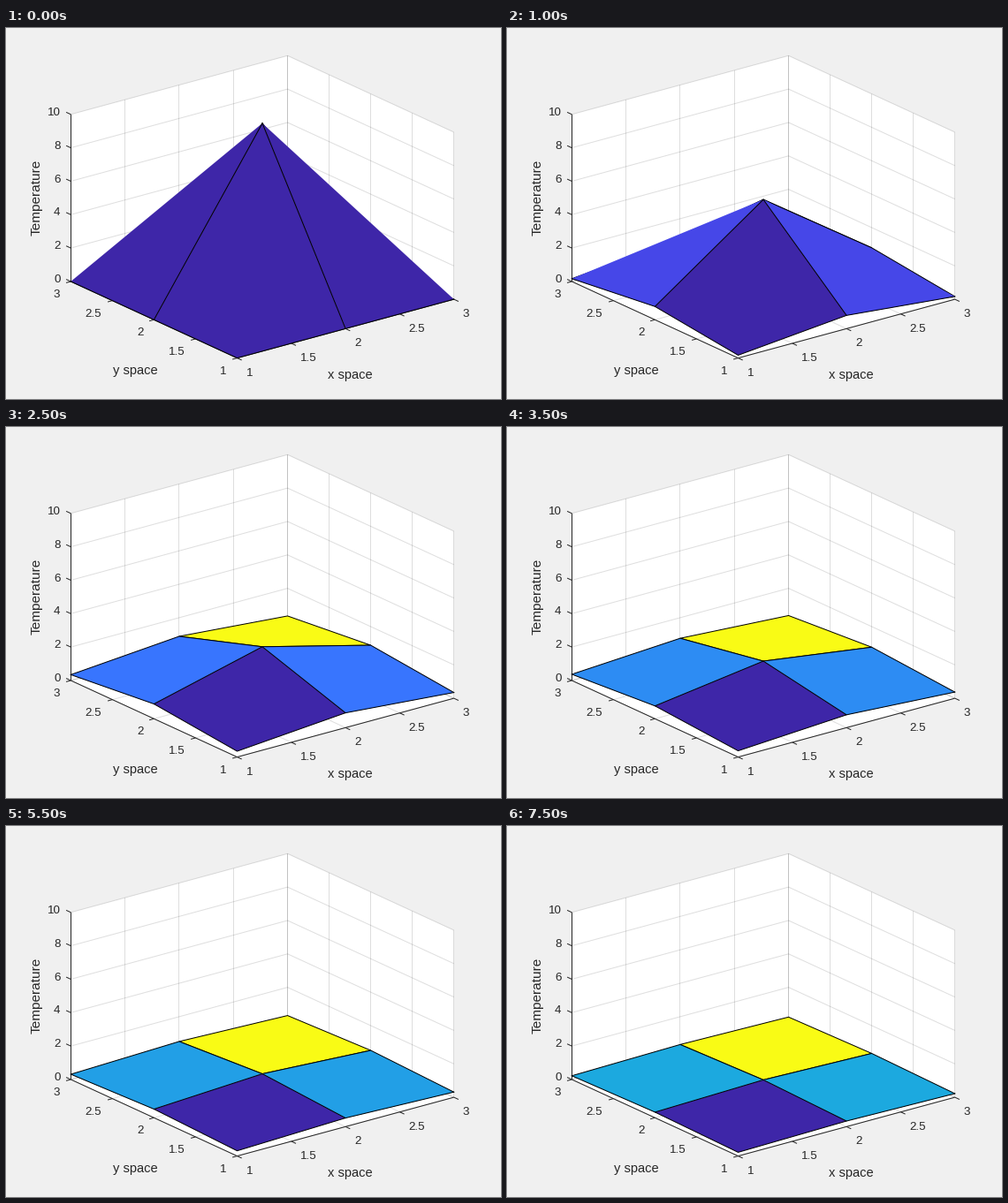
A matplotlib script for the animation above (8000 ms loop, 560x420 px).

```python
import numpy as np
import matplotlib.pyplot as plt
from matplotlib.animation import FuncAnimation
from matplotlib.colors import LinearSegmentedColormap
from matplotlib.patches import Polygon

W, H, DPI = 560, 420, 80
PX = 72 / DPI                      # points per pixel
FRAMES, INTERVAL = 16, 500
INK = "#262626"
GRID = (0.15, 0.15, 0.15, 0.15)

# Parula-like map: a few stops on the blue side, then the yellow end
STOPS = {0: "#3e26a8", 5: "#463cde", 10: "#4758f8", 15: "#3875fe",
         19: "#2d8cf3", 25: "#1ca9df", 63: "#f9fb15"}
CMAP = LinearSegmentedColormap.from_list(
    "heat", [(k / 63, c) for k, c in STOPS.items()], N=64)

# Orthographic view (azimuth -37.5, elevation 30) stretched to the axes box
AZ, EL = np.radians(37.5), np.radians(30)
LEFT, RIGHT, TOP, BOTTOM = 73.3, 506.7, 31.3, 373.6
SX = (RIGHT - LEFT) / (np.cos(AZ) + np.sin(AZ))
SY = (BOTTOM - TOP) / ((np.cos(AZ) + np.sin(AZ)) * np.sin(EL) + np.cos(EL))


def project(x, y, z):
    u, v, w = (x - 1) / 2, (y - 1) / 2, z / 10
    px = LEFT + SX * (np.sin(AZ) * (1 - v) + np.cos(AZ) * u)
    rise = (np.sin(AZ) * u + np.cos(AZ) * v) * np.sin(EL) + w * np.cos(EL)
    return px, BOTTOM - SY * rise


fig = plt.figure(figsize=(W / DPI, H / DPI), dpi=DPI, facecolor="#f0f0f0")
ax = fig.add_axes([0, 0, 1, 1])
ax.set_xlim(0, W)
ax.set_ylim(H, 0)
ax.axis("off")


def line(p, q, color, z):
    (x0, y0), (x1, y1) = p, q
    if abs(x0 - x1) < 0.01:        # keep verticals on one pixel column
        x0 = x1 = np.floor(x0) + 0.5
    ax.plot([x0, x1], [y0, y1], color=color, lw=PX, zorder=z, snap=False,
            solid_capstyle="butt")


def label(x, y, s, size=40 / 3, **kw):
    ax.text(x, y, s, family="Liberation Sans", fontsize=size * PX, color=INK,
            va="baseline", **kw)


def draw_box():
    outline = [project(*p) for p in [(1, 3, 10), (3, 3, 10), (3, 1, 10),
                                     (3, 1, 0), (1, 1, 0), (1, 3, 0)]]
    ax.add_patch(Polygon(outline, fc="white", ec="none", zorder=0))

    ticks = np.arange(1, 3.1, 0.5)
    for t in ticks:
        line(project(t, 3, 0), project(t, 3, 10), GRID, 1)
        line(project(3, t, 0), project(3, t, 10), GRID, 1)
        line(project(t, 1, 0), project(t, 3, 0), GRID, 1)
        line(project(1, t, 0), project(3, t, 0), GRID, 1)
    for z in range(0, 11, 2):
        line(project(1, 3, z), project(3, 3, z), GRID, 1)
        line(project(3, 1, z), project(3, 3, z), GRID, 1)

    corner = project(1, 1, 0)
    line(corner, project(3, 1, 0), INK, 2)
    line(corner, project(1, 3, 0), INK, 2)
    line(project(1, 3, 0), project(1, 3, 10), INK, 2)

    for t in ticks:
        x, y = project(t, 1, 0)
        line((x, y), (x + 5.2, y + 2.4), INK, 2)
        label(x + 10.2, y + 19.9, f"{t:g}", ha="left")
        x, y = project(1, t, 0)
        line((x, y), (x - 5.3, y + 1.45), INK, 2)
        label(x - 12.1, y + 17.9, f"{t:g}", ha="right")
    for z in range(0, 11, 2):
        x, y = project(1, 3, z)
        line((x, y), (x - 5.2, y - 2.4), INK, 2)
        label(x - 11.8, y + 1.2, f"{z}", ha="right")

    size = 44 / 3
    label(146.7, 392, "y space", size, ha="center")
    label(389.7, 397, "x space", size, ha="center")
    label(38.3, 192, "Temperature", 15.4, ha="center", rotation=90,
          rotation_mode="anchor")


# Implicit heat step on a 3x3 plate with cold surroundings,
# reduced by symmetry to (corner, edge, centre)
A = 0.1
STEP = np.linalg.inv(np.array([[1 + 4 * A, -2 * A, 0],
                               [-2 * A, 1 + 4 * A, -A],
                               [0, -4 * A, 1 + 4 * A]]))


def plate(n):
    return np.linalg.matrix_power(STEP, n) @ [0, 0, 10]


def face(z, color="none", edge=None):
    p = Polygon([(0, 0)] * 3, closed=True, fc=color, ec=edge or "none",
                lw=PX if edge else 0, joinstyle="round", zorder=z)
    return ax.add_patch(p)


def stroke(z):
    return ax.plot([], [], color="black", lw=PX, zorder=z,
                   solid_joinstyle="round")[0]


class Side:
    """Side face folded along tip-centre; the near half hides the far one."""

    def __init__(self):
        self.quad, self.far = face(4), stroke(5)
        self.fold, self.near = face(6), stroke(7)

    def place(self, tip, far, mid, near, color):
        self.quad.set_xy([tip, far, mid, near])
        self.fold.set_xy([tip, mid, near])
        self.far.set_data(*zip(tip, far, mid))
        self.near.set_data(*zip(tip, near))
        for part in (self.quad, self.fold):
            part.set_facecolor(color)


draw_box()
back = face(3, CMAP(1.0), "black")
left, right = Side(), Side()
front = face(8, CMAP(0.0), "black")


def update(n):
    heights = plate(n)[::-1]       # by grid distance from the centre
    centre, edge, corner = heights

    def node(x, y):
        return project(x, y, heights[abs(x - 2) + abs(y - 2)])

    mid = node(2, 2)
    shade = CMAP((edge - corner) / (centre - corner))
    back.set_xy([mid, node(3, 2), node(3, 3), node(2, 3)])
    left.place(node(1, 3), node(2, 3), mid, node(1, 2), shade)
    right.place(node(3, 1), node(3, 2), mid, node(2, 1), shade)
    front.set_xy([node(1, 1), node(2, 1), mid, node(1, 2)])
    return []


anim = FuncAnimation(fig, update, frames=FRAMES, interval=INTERVAL,
                     repeat=True, repeat_delay=0, blit=False)
plt.show()
```
